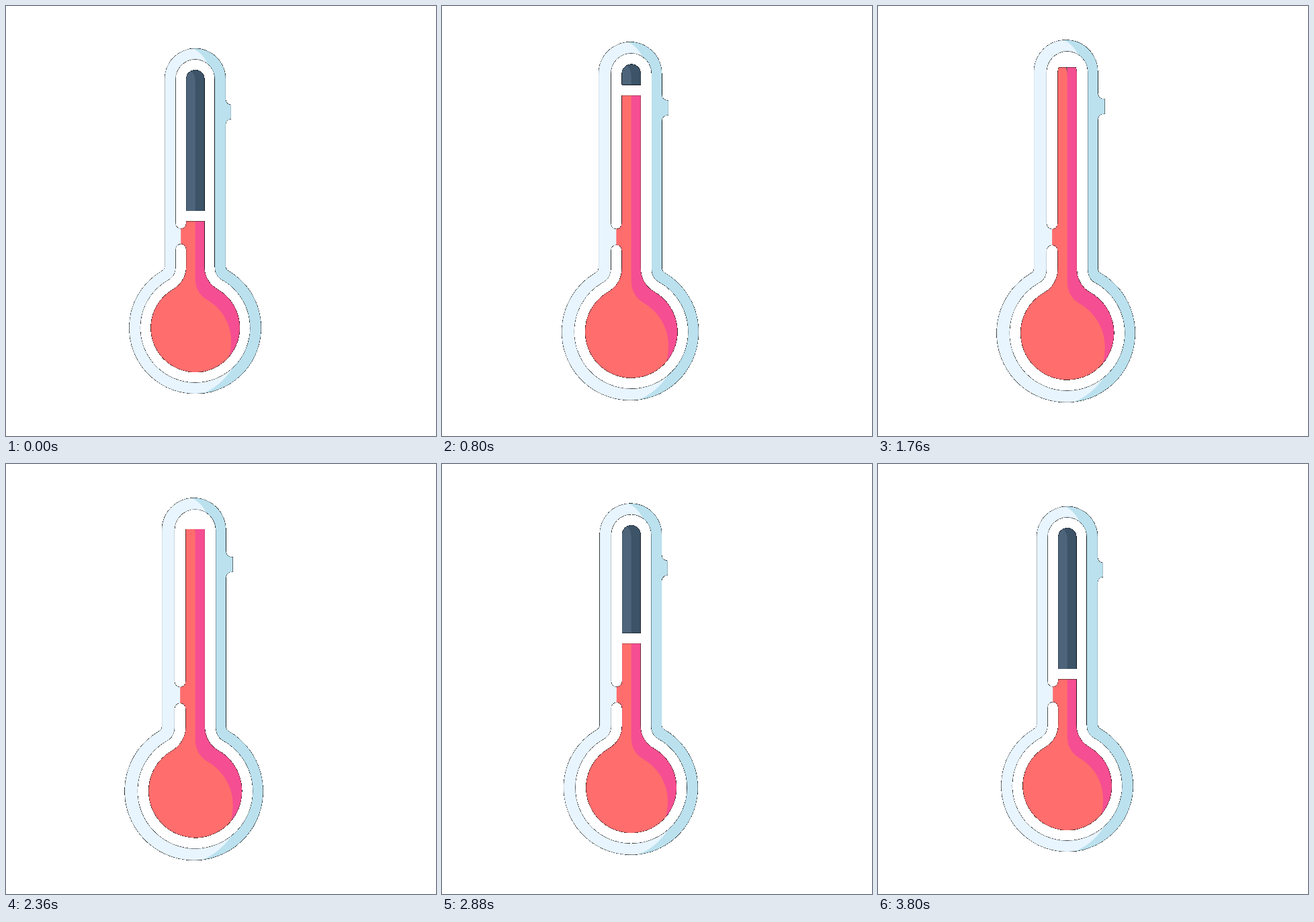
An HTML page with a canvas that plays this animation: 640x640 px, repeating every 3880 ms.

```html
<!DOCTYPE html>
<html lang="en">
<head>
<meta charset="utf-8">
<title>Thermometer</title>
<style>
html, body { margin: 0; width: 100%; height: 100%; overflow: hidden; background: #fff; }
canvas { display: block; width: 640px; height: 640px; }
</style>
</head>
<body>
<canvas id="stage" width="640" height="640"></canvas>
<script>
const ctx = document.getElementById('stage').getContext('2d', { willReadFrequently: true });

const LOOP = 3880, STEP = 40;
const RISE_END = 1760, FALL_START = 2320, FALL_END = 3800;
const MID = 320, CX = 281.75, CAP_Y = 108.6, NECK_Y = 388, BULB_Y = 478.9;
const LOW = 320.6, HIGH = 102.4, GAP = 15.5, GROW = 0.05;
const GLASS = '#e8f5ff', GLASS_SHADE = '#bbe1ee';
const FLUID = '#ff6d6d', FLUID_SHADE = '#f64e92';
const SLOT = '#4d647a', SLOT_SHADE = '#3c5368';

function bezier(x1, y1, x2, y2) {
  const at = (a, b, t) => 3 * a * t * (1 - t) ** 2 + 3 * b * t * t * (1 - t) + t ** 3;
  return u => {
    if (u <= 0) return 0;
    if (u >= 1) return 1;
    let lo = 0, hi = 1;
    for (let i = 0; i < 30; i++) {
      const m = (lo + hi) / 2;
      if (at(x1, x2, m) < u) lo = m; else hi = m;
    }
    return at(y1, y2, lo);
  };
}

const easeSize = bezier(0.33, 0.1, 0.2, 1);
const easeRise = bezier(0.28, 0.2, 0.12, 1);
const easeFall = bezier(0.27, 0.2, 0.1, 1);

// Tube of half width h joined to a bulb of radius r; the neck meets the bulb at half width d.
function flask(x, h, r, d) {
  const p = new Path2D();
  const e = Math.sqrt(r * r - d * d), y = BULB_Y - e;
  const len = 0.36 * Math.hypot(d - h, y - NECK_Y);
  const cx = d - len * e / r, cy = y - len * d / r;
  const bend = NECK_Y + len, a = Math.atan2(-e, d);
  p.moveTo(x - h, NECK_Y);
  p.lineTo(x - h, CAP_Y);
  p.arc(x, CAP_Y, h, Math.PI, 0);
  p.lineTo(x + h, NECK_Y);
  p.bezierCurveTo(x + h, bend, x + cx, cy, x + d, y);
  p.arc(x, BULB_Y, r, a, Math.PI - a);
  p.bezierCurveTo(x - cx, cy, x - h, bend, x - h, NECK_Y);
  p.closePath();
  return p;
}

const outer = flask(281.55, 45.3, 98.1, 49.8);
const inner = flask(281.6, 29.28, 81.8, 39);
const core = flask(CX, 13.45, 66.1, 32.7);

const glassShade = new Path2D(
  'M277 60 V63 C286 66 294 74 299 84 V380 L336 541 Q318 567 291 577.5 V590 H400 V60 Z');
const fluidShade = new Path2D(
  'M281.7 80 V406 C281.7 420 288 430 298 436.5 C322 450 335 474 335 498 C335 506 334 514 332 523 L360 540 V80 Z');
const slotShade = new Path2D('M274 90 V96 Q281.7 100 281.7 114 V400 H300 V90 Z');
const slotSliver = new Path2D('M274 90 V96 Q281.7 100 281.7 114 V90 Z');

// Gap in the ring on the left, narrowed by the round ends of the ring.
const bridge = new Path2D();
bridge.moveTo(250, 323.7);
bridge.arc(260.2, 323.7, 7.9, Math.PI, 0, true);
bridge.lineTo(274, 323.7);
bridge.lineTo(274, 362);
bridge.arc(260.2, 362, 7.9, 0, Math.PI, true);
bridge.lineTo(250, 362);
bridge.closePath();

function paint(path, color, mode = 'source-over') {
  ctx.globalCompositeOperation = mode;
  ctx.fillStyle = color;
  ctx.fill(path);
}

function rect(x, y, w, h) {
  const p = new Path2D();
  p.rect(x, y, w, h);
  return p;
}

function zoom(x, s) {
  ctx.setTransform(s, 0, 0, s, x * (1 - s), MID * (1 - s));
}

function tab(right) {
  return new Path2D(`M322 139 H326.85 A8 8 0 0 0 334.85 147 H${right} V168.3 H334.85 A8 8 0 0 0 326.85 176.3 H322 Z`);
}

function clipped(area, draw) {
  ctx.save();
  ctx.clip(area);
  draw();
  ctx.restore();
}

// Partly covered pixels blend with black, empty ones turn white: a thin dark rim.
function rim() {
  const img = ctx.getImageData(0, 0, 640, 640), px = img.data;
  for (let i = 0; i < px.length; i += 4) {
    const a = px[i + 3];
    if (a === 255) continue;
    for (let c = i; c < i + 3; c++) px[c] = a > 20 ? px[c] * a / 255 : 255;
    px[i + 3] = 255;
  }
  ctx.putImageData(img, 0, 0);
}

function render(size, level) {
  const s = 1 + GROW * size, top = LOW + (HIGH - LOW) * level;
  ctx.setTransform(1, 0, 0, 1, 0, 0);
  ctx.clearRect(0, 0, 640, 640);

  zoom(MID, s);
  paint(outer, GLASS);
  paint(glassShade, GLASS_SHADE, 'source-atop');
  // The tab's end follows the inner parts, not the glass.
  paint(tab(MID + (CX + 53.1 * s - MID) / s), GLASS_SHADE);

  zoom(CX, s);
  paint(inner, '#000', 'destination-out');
  paint(bridge, GLASS);
  paint(rect(260.2, 322, 14, 42), FLUID, 'source-atop');

  clipped(rect(200, 60, 160, Math.max(0, top - GAP - 60)), () => {
    paint(core, SLOT);
    ctx.clip(core);
    paint(slotShade, SLOT_SHADE, 'source-atop');
  });
  clipped(rect(200, top, 160, 600 - top), () => {
    paint(core, FLUID);
    ctx.clip(core);
    paint(slotSliver, SLOT_SHADE, 'source-atop');
    paint(fluidShade, FLUID_SHADE, 'source-atop');
  });
  rim();
}

let start, last;
function tick(now) {
  start ??= now;
  const t = Math.floor((now - start) % LOOP / STEP) * STEP;
  if (t !== last) {
    last = t;
    if (t < FALL_START) {
      const u = t / RISE_END;
      render(easeSize(u), easeRise(u));
    } else {
      const u = (t - FALL_START) / (FALL_END - FALL_START);
      render(1 - easeSize(u), 1 - easeFall(u));
    }
  }
  requestAnimationFrame(tick);
}
requestAnimationFrame(tick);
</script>
</body>
</html>
```
